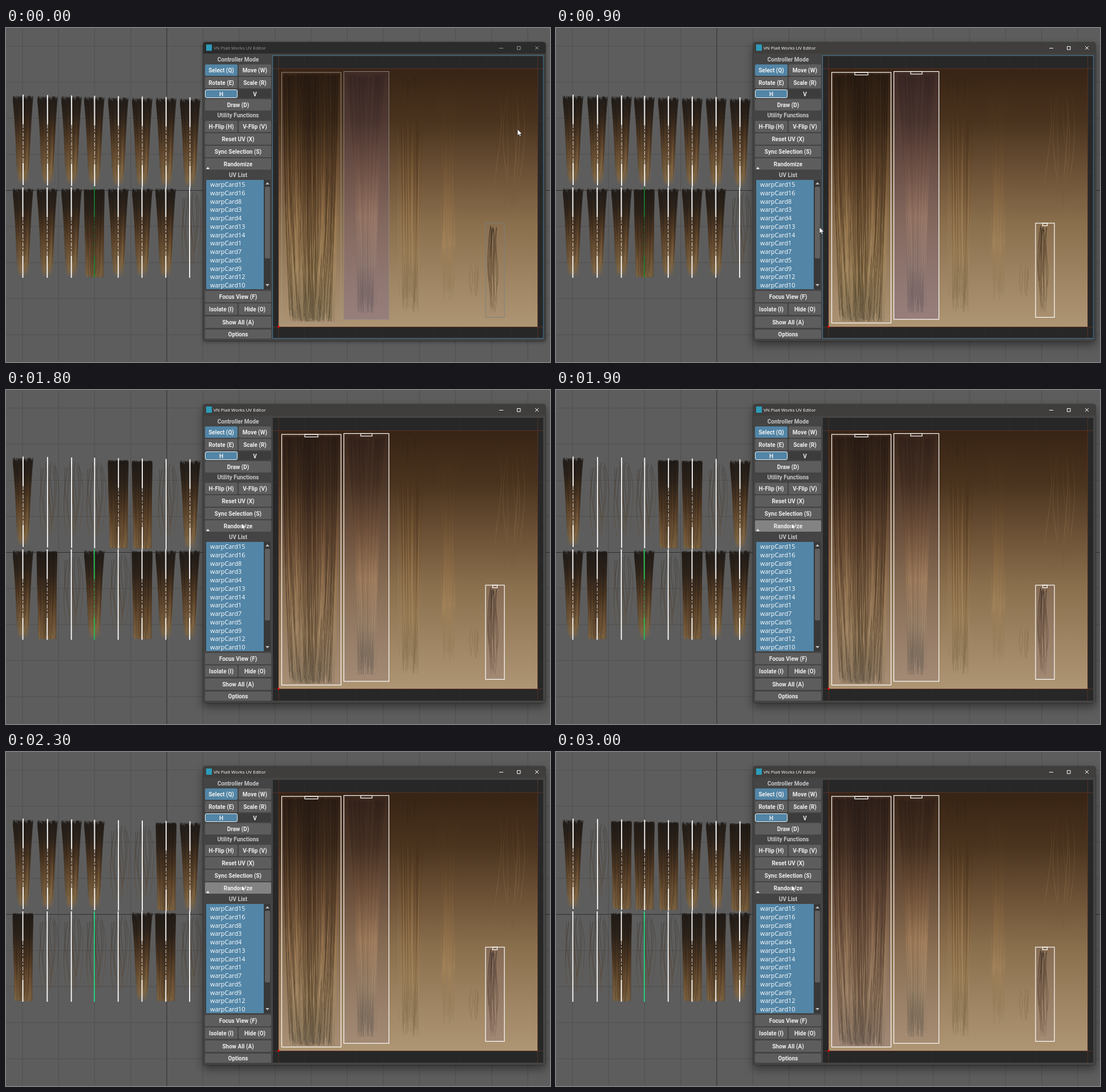
An HTML page with a canvas that plays this animation: 954x587 px, repeating every 3200 ms.

```html
<!DOCTYPE html>
<html lang="en">
<head>
<meta charset="utf-8">
<title>Hair card UV editor</title>
<style>
html, body { margin: 0; width: 100%; height: 100%; overflow: hidden; background: #5d5d5d; }
#stage { position: relative; width: 954px; height: 587px; overflow: hidden; }
#stage canvas, #stage div, #stage svg { position: absolute; box-sizing: border-box; }
#win { left: 346px; top: 25px; width: 600px; height: 525px; background: #444; border-radius: 4px; box-shadow: 0 2px 7px rgba(0,0,0,.35), 0 0 0 1px rgba(40,40,40,.5); }
#win.active { box-shadow: 0 7px 16px rgba(0,0,0,.45), 0 0 0 1px rgba(60,60,60,.6); }
#bar { width: 600px; height: 20px; background: #2b2b2b; color: #979797; border-radius: 4px 4px 0 0; }
.active #bar { background: #3f3e3c; color: #fff; }
#icon { left: 5px; top: 4px; width: 10px; height: 11px; background: #2d9cba; }
#name { left: 18px; top: 0; font: 8px/19px "Open Sans", "Noto Sans", sans-serif; white-space: nowrap; }
#bar svg { left: 515px; top: 4px; fill: none; stroke: currentColor; }
.cell { color: #eee; text-align: center; font: 700 10px Roboto, Arial, sans-serif; white-space: nowrap; }
.btn { background: #5d5d5d; border-radius: 2px; }
.on { background: #5285a6; }
.focus { border: 1px solid #e8eef2; border-radius: 3px; }
.off { background: #3c3c3c; }
.head { color: #c8c8c8; }
.down { background: #838383; }
#list { left: 4px; top: 242px; width: 114px; height: 192px; background: #383838; overflow: hidden; }
#items { left: 1px; top: 0; width: 101px; height: 192px; background: #5285a6; color: #fff; font: 10.8px/14.75px "Open Sans", "Noto Sans", sans-serif; }
#items div { left: 7px; height: 14.75px; white-space: nowrap; }
#thumb { left: 104px; top: 12px; width: 9px; height: 126px; background: #606060; border-radius: 2px; }
#list svg { left: 103px; top: 0; }
#uv { left: 121px; top: 23px; }
</style>
</head>
<body>
<div id="stage">
  <canvas id="scene" width="954" height="587"></canvas>
  <div id="win">
    <div id="bar">
      <div id="icon"></div>
      <div id="name">VN Plait Works UV Editor</div>
      <svg width="80" height="12"><path d="M4 6.5h7M35.500 3.500h5.500v5.500h-5.500zM67 3l6 6M73 3l-6 6"/></svg>
    </div>
    <div id="list">
      <div id="items"></div>
      <div id="thumb"></div>
      <svg width="11" height="192" fill="#bbb"><path d="M2 8l3.500-4 3.500 4zM2 183l3.500 4 3.500-4z"/></svg>
    </div>
    <canvas id="uv" width="477" height="500"></canvas>
  </div>
  <svg id="cursor" width="12" height="17" viewBox="-1 -1 12 17"><path d="M0 0V11L2.600 8.700 4.300 12.600 6.200 11.800 4.500 8H8Z" fill="#fff" stroke="#222" stroke-width=".7"/></svg>
</div>
<script>
const $ = id => document.getElementById(id);
const win = $('win'), cursor = $('cursor');
const scene = $('scene').getContext('2d');
const uv = $('uv').getContext('2d');
const LOOP = 3200, STEP = 100;

// ---- panel ----
function cell(x, y, w, h, text, cls) {
  const d = document.createElement('div');
  d.className = 'cell ' + cls;
  d.textContent = text;
  const inner = cls.includes('focus') ? h - 2 : h;
  d.style.cssText = `left:${x - 346}px;top:${y - 25}px;width:${w}px;height:${h}px;line-height:${inner + 2}px`;
  win.append(d);
  return d;
}
const wide = (y, text, cls = 'btn', h = 20) => cell(349, y, 116, h, text, cls);
function pair(y, a, b, clsA = 'btn', clsB = 'btn', h = 20) {
  cell(349, y, 57, h, a, clsA);
  cell(408, y, 57, h, b, clsB);
}
wide(48, 'Controller Mode', 'head', 14);
pair(64, 'Select (Q)', 'Move (W)', 'btn on');
pair(86, 'Rotate (E)', 'Scale (R)');
pair(108, 'H', 'V', 'btn on focus', 'btn off', 15);
wide(125, 'Draw (D)');
wide(146, 'Utility Functions', 'head', 14);
pair(163, 'H-Flip (H)', 'V-Flip (V)');
wide(185, 'Reset UV (X)');
wide(207, 'Sync Selection (S)');
const randomize = wide(229, 'Randomize');
randomize.insertAdjacentHTML('beforeend', '<svg style="left:2px;top:15px" width="6" height="4"><path d="M0 4L3 0 6 4z" fill="#eee"/></svg>');
wide(251, 'UV List', 'head', 14);
wide(462, 'Focus View (F)');
pair(484, 'Isolate (I)', 'Hide (O)');
wide(507, 'Show All (A)');
wide(530, 'Options', 'btn', 16);
[15, 16, 8, 3, 4, 13, 14, 1, 7, 5, 9, 12, 10].forEach((n, i) => {
  const d = document.createElement('div');
  d.textContent = 'warpCard' + n;
  d.style.top = i * 14.75 + 1 + 'px';
  $('items').append(d);
});

// ---- hair ----
let seed = 7;
function rnd() {
  seed = (seed * 16807) % 2147483647;
  return seed / 2147483647;
}
const sym = () => rnd() * 2 - 1;

function ramp(g, y, h, colors) {
  const grad = g.createLinearGradient(0, y, 0, y + h);
  colors.forEach((c, i) => grad.addColorStop(i / (colors.length - 1), c));
  return grad;
}

// Strands run from half-width `top` to half-width `end` through `mid`.
function hair(g, o) {
  const inks = o.inks.map(c => ramp(g, o.y, o.h, c));
  for (let i = 0; i < o.n; i++) {
    const u = sym(), wob = o.wave || 0;
    const y0 = o.y + rnd() * (o.ragTop || 3);
    const y1 = o.y + o.h - rnd() ** 2 * (o.rag || 10);
    const len = y1 - y0;
    g.strokeStyle = inks[Math.floor(rnd() * inks.length)];
    g.lineWidth = (o.width || 0.8) * (0.6 + rnd() * 0.6);
    g.beginPath();
    g.moveTo(o.x + u * o.top, y0);
    g.bezierCurveTo(
      o.x + u * o.mid + sym() * wob, y0 + len * 0.35,
      o.x + u * o.mid + sym() * wob, y0 + len * 0.65,
      o.x + (u * 0.75 + sym() * 0.25) * o.end + sym() * wob * 0.4, y1);
    g.stroke();
  }
}

function sheet(w, h, paint) {
  const c = document.createElement('canvas');
  c.width = w;
  c.height = h;
  paint(c.getContext('2d'));
  return c;
}

const DARK = ['#1c1815', '#231c16', '#35271b', '#4b3724', '#604a30'];
const WARM = ['#201a16', '#30241a', '#4f3822', '#6d5133', '#806642'];
const fade = list => [...list, 'rgba(135,108,70,0)'];

const cards = {
  W: sheet(48, 166, g => hair(g, { x: 24, y: 3, h: 155, n: 230, top: 18, mid: 17, end: 17, rag: 8, ragTop: 5, inks: [DARK, WARM] })),
  M: sheet(48, 166, g => hair(g, { x: 24, y: 2, h: 156, n: 150, top: 18, mid: 13, end: 10, rag: 34, ragTop: 9, width: 0.75, inks: [fade(DARK), fade(WARM)] })),
  S: sheet(48, 166, g => hair(g, {
    x: 24, y: 6, h: 136, n: 11, top: 13, mid: 15, end: 16, wave: 12, rag: 60, ragTop: 14, width: 0.7,
    inks: [['rgba(45,36,28,.7)', 'rgba(70,52,34,.8)', 'rgba(105,80,50,.6)']]
  }))
};

// ---- texture in the UV view, in stage coordinates ----
function shift(g) {
  g.setTransform(1, 0, 0, 1, -467, -48);
}
function rule(g, x0, y0, x1, y1, color) {
  g.strokeStyle = color;
  g.lineWidth = 1;
  g.beginPath();
  g.moveTo(x0, y0);
  g.lineTo(x1, y1);
  g.stroke();
}

const texture = sheet(477, 500, g => {
  shift(g);
  g.fillStyle = '#272727';
  g.fillRect(467, 48, 477, 500);
  for (let i = 0; i <= 10; i++) {
    const p = i * 45.4;
    rule(g, 478 + p, 48, 478 + p, 548, '#2d2d2d');
    rule(g, 467, 71.5 + p, 944, 71.5 + p, '#2d2d2d');
  }
  g.fillStyle = ramp(g, 72, 453, ['#382415', '#49331e', '#6c5136', '#8a6f4d', '#9d8361', '#ae9573']);
  g.fillRect(478, 72, 454, 453);
  const edge = 'rgba(130,55,35,.5)';
  rule(g, 478, 48, 478, 548, edge);
  rule(g, 932.5, 48, 932.5, 548, edge);
  rule(g, 467, 71.5, 944, 71.5, edge);
  rule(g, 467, 525.5, 944, 525.5, edge);

  const clear = 'rgba(70,50,30,0)';
  const shade = ['#22170e', '#2a1c11', '#432e1a', '#564026', '#65502f', '#62553d'];
  const light = ['#2b1c11', '#453019', '#765533', '#a07d50', '#ab8e64', '#8a7856'];
  hair(g, { x: 535, y: 80, h: 436, n: 300, top: 48, mid: 46, end: 41, rag: 30, ragTop: 6, wave: 4, width: 0.8, inks: [shade, light] });
  hair(g, {
    x: 632, y: 80, h: 421, n: 115, top: 33, mid: 20, end: 17, rag: 70, ragTop: 10, wave: 5, width: 0.65,
    inks: [['#2a1b11', '#432d1a', '#795637', '#b08a5e', '#a98d69', 'rgba(105,96,76,.35)'], ['#281a10', '#382616', '#664a2c', '#917049', '#827253', 'rgba(92,85,68,.45)']]
  });
  hair(g, {
    x: 708, y: 82, h: 417, n: 62, top: 24, mid: 18, end: 19, rag: 70, ragTop: 20, wave: 6, width: 0.55,
    inks: [['rgba(42,27,14,.8)', '#513820', '#8a673c', '#b08c5f', '#ab8f68', 'rgba(105,88,62,.35)'], [clear, '#452f1a', '#694c2d', '#8c7048', 'rgba(113,94,67,.55)']]
  });
  hair(g, {
    x: 776, y: 85, h: 393, n: 26, top: 21, mid: 8, end: 14, rag: 110, ragTop: 40, wave: 8, width: 0.5,
    inks: [[clear, '#573e22', '#8f6b40', '#b48f62', 'rgba(130,104,70,.5)'], [clear, '#4e3820', '#7b5c3a', '#a98756', 'rgba(115,95,66,.4)']]
  });
  hair(g, {
    x: 882, y: 80, h: 250, n: 8, top: 24, mid: 22, end: 26, rag: 90, ragTop: 30, wave: 20, width: 0.7,
    inks: [['rgba(45,28,14,.5)', 'rgba(110,82,50,.7)', 'rgba(150,116,76,.7)', clear]]
  });
  hair(g, {
    x: 822, y: 400, h: 72, n: 5, top: 8, mid: 8, end: 10, rag: 20, ragTop: 25, wave: 6, width: 0.6,
    inks: [[clear, 'rgba(95,70,42,.6)', 'rgba(100,78,50,.5)']]
  });
  hair(g, {
    x: 857.5, y: 347, h: 154, n: 13, top: 8, mid: 10, end: 9, rag: 80, ragTop: 8, wave: 9, width: 0.75,
    inks: [['#3f3123', '#544029', '#6b5538', 'rgba(105,86,60,.35)']]
  });
  g.fillStyle = '#f00';
  g.fillRect(476.5, 523.5, 3, 3);
});

// ---- scene ----
const backdrop = sheet(954, 587, g => {
  g.fillStyle = '#5d5d5d';
  g.fillRect(0, 0, 954, 587);
  for (let i = -4; i <= 10; i++) {
    const x = 282 + i * 63.3;
    rule(g, x, 0, x, 587, i ? '#505050' : '#303030');
  }
  for (let i = -4; i <= 4; i++) {
    const y = 285.5 + i * 63.4;
    rule(g, 0, y, 954, y, i ? '#505050' : '#303030');
  }
});

function drawCard(kind, i) {
  const col = i % 8, low = i > 7;
  const x = 30 + col * 41.8 + (col === 1 ? 1 : 0) + (col === 2 ? 1.5 : 0) + (low ? -0.5 : 0);
  const y = low ? 280 : 117 + col * 0.7;
  const picked = i === 11;
  scene.drawImage(cards[kind], Math.round(x) - 24, Math.round(y));
  scene.lineWidth = 1.8;
  scene.strokeStyle = !picked ? '#fff' : kind === 'W' ? '#177d2c' : kind === 'M' ? '#22bd50' : '#1fdc83';
  const line = (a, b) => {
    scene.beginPath();
    scene.moveTo(x, y + a);
    scene.lineTo(x, y + b);
    scene.stroke();
  };
  if (kind === 'S') return line(0, 159);
  line(0, 52);
  line(120, 159);
  scene.lineWidth = 1;
  scene.globalAlpha = 0.8;
  scene.setLineDash([7, 2, 3, 3]);
  line(52, 120);
  scene.setLineDash([]);
  scene.globalAlpha = 1;
}

// Card kinds over time: wide, medium, sparse.
const layouts = [
  [0, 'MMMMMMMMMMMWMMMS'],
  [18, 'MSSSWWSMMWSMSWMM'],
  [20, 'WMSMMSMWSMWWMSMW'],
  [23, 'MMMMSSWMWSSSSMWS'],
  [24, 'WSSWWWMSWMWMWMSW'],
  [26, 'SMWMSMWMMWSWMSWS'],
  [28, 'MSWWWMMWSSWSSWWM']
];
const boxes = [
  { kind: 'W', x: 483.5, y: 78, w: 104, h: 440.5, notch: 23, idle: '#a0968a' },
  { kind: 'M', x: 592.5, y: 76.5, w: 79, h: 435.5, notch: 20, idle: '#918b8b' },
  { kind: 'S', x: 841, y: 343, w: 33, h: 165.5, notch: 8, idle: '#78807f' }
];
const path = [
  [897, 178], [901, 160], [901, 149], [820, 218], [700, 335], [590, 425], [523, 476],
  [516, 470], [494, 420], [462, 350], [432, 285], [416, 252], [411, 245], [412, 238], [413, 234]
];

// Overlapping cards add up to a stronger tint, weaker over the dark roots.
function tint(b, count) {
  const ink = a => `rgba(108,84,146,${a * count})`;
  uv.fillStyle = ramp(uv, 76, 440, [ink(0.009), ink(0.016), ink(0.023)]);
  uv.fillRect(b.x, b.y, b.w, b.h);
}

function drawUV(layout, k, tip) {
  shift(uv);
  uv.drawImage(texture, 467, 48);
  const selected = k >= 7;
  for (const b of boxes) {
    tint(b, layout.split(b.kind).length - 1);
    uv.strokeStyle = selected ? '#fff' : b.idle;
    uv.lineWidth = selected ? 1.2 : 0.9;
    uv.strokeRect(b.x, b.y, b.w, b.h);
    if (selected) uv.strokeRect(b.x + (b.w - b.notch) / 2, b.y, b.notch, 4.5);
  }
  if (k >= 3 && k <= 6) {
    const x = tip[0] + 6.5, y = tip[1] - 5.5;
    uv.strokeStyle = 'rgba(160,145,130,.5)';
    uv.lineWidth = 0.9;
    uv.strokeRect(x, 149, 901.5 - x, y - 149);
  }
  if (k < 17) {
    uv.strokeStyle = '#4a7590';
    uv.lineWidth = 1.2;
    uv.strokeRect(467.5, 48.5, 475, 497);
  } else {
    uv.fillStyle = '#444';
    uv.fillRect(467, 48, 477, 1);
    uv.fillRect(467, 48, 1, 500);
    uv.fillRect(942, 48, 2, 500);
  }
  uv.fillStyle = '#444';
  uv.fillRect(467, 546, 477, 2);
}

const isDown = k => [17, 19, 21, 22, 23, 25, 27].includes(k);
let last = -1;

function frame() {
  const k = Math.floor((performance.now() % LOOP) / STEP);
  if (k !== last) {
    last = k;
    const layout = layouts.filter(l => l[0] <= k).pop()[1];
    const tip = path[Math.min(k, path.length - 1)];
    win.className = k ? 'active' : '';
    randomize.classList.toggle('down', isDown(k));
    cursor.style.left = tip[0] - 1 + 'px';
    cursor.style.top = tip[1] - 1 + 'px';
    scene.drawImage(backdrop, 0, 0);
    [...layout].forEach(drawCard);
    drawUV(layout, k, tip);
  }
  requestAnimationFrame(frame);
}
frame();
</script>
</body>
</html>
```
